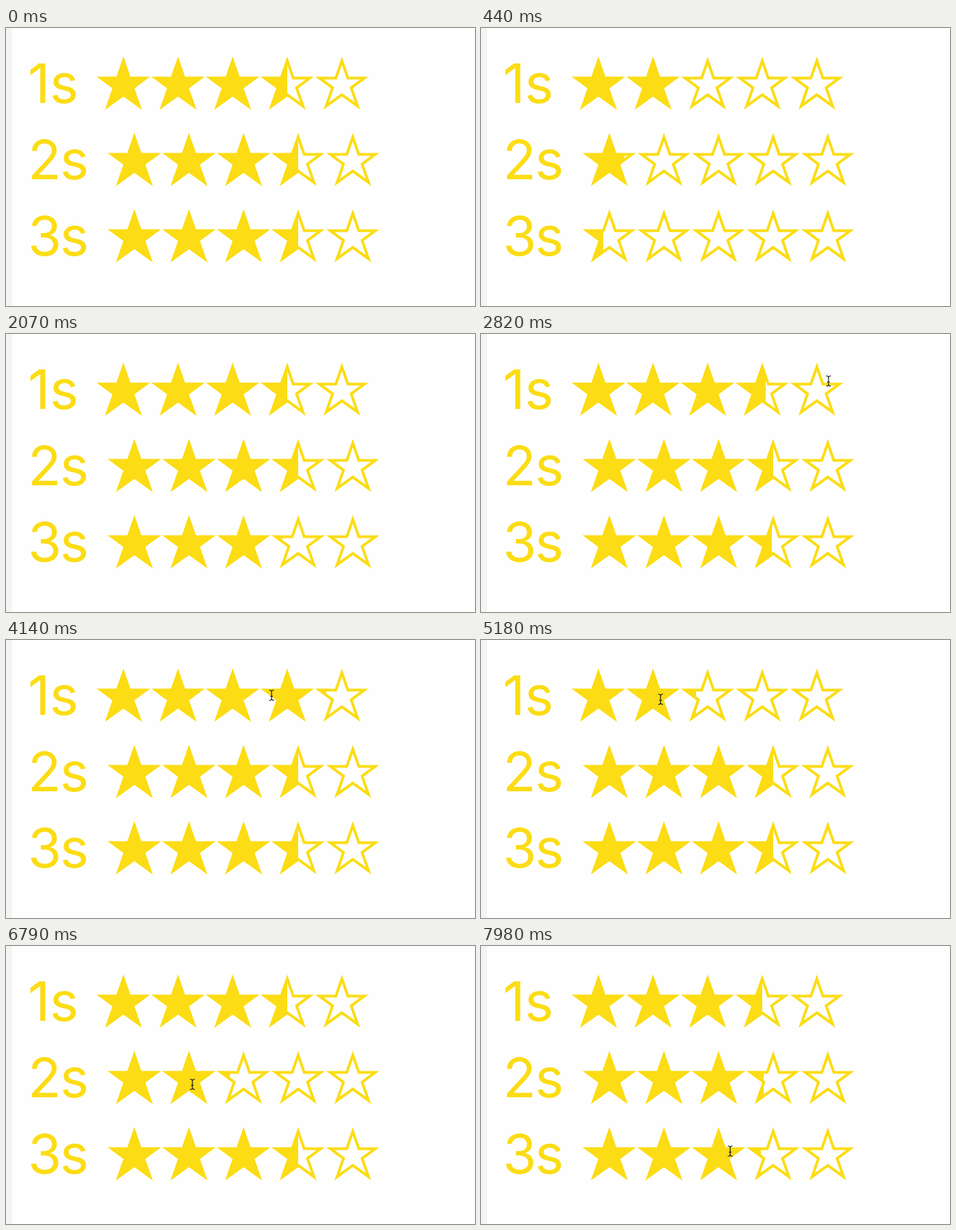
An HTML page without scripts that plays this animation: 687x408 px, repeating every 8 s.

```html
<!DOCTYPE html>
<html lang="en">
<head>
<meta charset="utf-8">
<title>Star rating transitions</title>
<style>
@property --t { syntax: "<number>"; inherits: true; initial-value: 0; }
@property --a { syntax: "<number>"; inherits: true; initial-value: 280; }
@property --b { syntax: "<number>"; inherits: true; initial-value: 280; }
@property --s { syntax: "<number>"; inherits: true; initial-value: 0; }

html, body { margin: 0; width: 100%; height: 100%; overflow: hidden; background: #fefefe; }
body { position: relative; animation: clock 8s infinite; }
svg { position: absolute; left: 0; top: 0; display: block; }
text { font: 400 80px Inter, "Liberation Sans", sans-serif; fill: #fcdc14; }
.full { fill: #fcdc14; }
.hollow { fill: none; stroke: #fcdc14; stroke-width: 8; }

@keyframes clock {
  0% { --t: 0; animation-timing-function: step-end; }
  1.6625% { --t: 140; animation-timing-function: steps(53, end); }
  99.56%, 100% { --t: 7980; }
}

/* Each row eases from width a to width b, starting at s */
.row { animation: 8s step-end infinite; }
.r1 { --d: 1000; --left: 132px; --top: 42px; animation-name: r1; }
.r2 { --d: 2000; --left: 148px; --top: 154px; animation-name: r2; }
.r3 { --d: 3000; --left: 148px; --top: 266px; animation-name: r3; }
@keyframes r1 {
  0% { --a: 280; --b: 280; --s: 0; }
  1.6625% { --a: 0; --b: 280; --s: 103; }
  34.91% { --a: 280; --b: 400; --s: 2740; }
  45.99% { --a: 400; --b: 320; --s: 3650; }
  58.92% { --a: 320; --b: 160; --s: 4605; }
  71.85%, 100% { --a: 160; --b: 280; --s: 5640; }
}
@keyframes r2 {
  0% { --a: 280; --b: 280; --s: 0; }
  1.6625% { --a: 0; --b: 280; --s: 103; }
  71.85% { --a: 280; --b: 160; --s: 5735; }
  86.63%, 100% { --a: 178; --b: 280; --s: 6840; }
}
@keyframes r3 {
  0% { --a: 280; --b: 280; --s: 0; }
  1.6625% { --a: 0; --b: 280; --s: 103; }
  90.33%, 100% { --a: 280; --b: 240; --s: 7170; }
}

/* The standard ease curve: solve its x cubic for u, then evaluate y */
.fill {
  --x: clamp(0, (var(--t) - var(--s)) / var(--d), 1);
  --q: calc((var(--x) - 0.15625) / 2);
  --r: sqrt(var(--q) * var(--q) + 0.0065918);
  --u: calc(0.25 + pow(var(--r) + var(--q), 1 / 3) - pow(var(--r) - var(--q), 1 / 3));
  --v: calc(1 - var(--u));
  --e: calc(var(--u) * (0.3 * var(--v) * var(--v) + 3 * var(--v) * var(--u) + var(--u) * var(--u)));
  position: absolute;
  left: var(--left);
  top: var(--top);
  height: 80px;
  width: calc((var(--a) + (var(--b) - var(--a)) * var(--e)) * 1px);
  overflow: hidden;
}

.cursor { animation: move 8s step-end infinite; }
.arrow { animation: arrow 8s step-end infinite; }
.beam { animation: beam 8s step-end infinite; }
@keyframes move {
  0% { transform: translate(-60px, -60px); }
  29.37% { transform: translate(514px, 394px); }
  31.22% { transform: translate(617px, 240px); }
  33.06% { transform: translate(575px, 120px); }
  34.91% { transform: translate(509px, 69px); }
  36.76% { transform: translate(496px, 50px); animation-timing-function: steps(4, end); }
  44.15% { transform: translate(470px, 74px); }
  45.99% { transform: translate(440px, 80px); }
  47.84% { transform: translate(415px, 82px); }
  49.69% { transform: translate(398px, 81px); }
  51.53% { transform: translate(389px, 81px); animation-timing-function: steps(3, end); }
  57.08% { transform: translate(384px, 82px); }
  58.92% { transform: translate(264px, 86px); }
  64.46% { transform: translate(263px, 87px); animation-timing-function: steps(3, end); }
  70.01% { transform: translate(262px, 92px); }
  71.85% { transform: translate(266px, 165px); }
  73.7% { transform: translate(272px, 208px); animation-timing-function: steps(6, end); }
  84.78% { transform: translate(273px, 203px); }
  86.63% { transform: translate(276px, 232px); }
  88.48% { transform: translate(300px, 249px); }
  90.33% { transform: translate(325px, 320px); animation-timing-function: steps(5, end); }
  99.56%, 100% { transform: translate(365px, 301px); }
}
@keyframes arrow {
  0%, 34.91%, 90.33%, 100% { opacity: 0; }
  29.37%, 88.48% { opacity: 1; }
}
@keyframes beam {
  0%, 34.91%, 90.33%, 100% { opacity: 1; }
  29.37%, 88.48% { opacity: 0; }
}
</style>
</head>
<body>
<svg width="687" height="408" viewBox="0 0 687 408">
  <defs>
    <path id="star" d="M40 0L50.2 29.5H79L56 46.5 67 78 40 58.5 13 78 24 46.5 1 29.5H29.8Z"/>
    <clipPath id="inside"><use href="#star"/></clipPath>
    <g id="one"><use href="#star" clip-path="url(#inside)"/></g>
    <g id="five">
      <use href="#one"/>
      <use href="#one" x="80"/>
      <use href="#one" x="160"/>
      <use href="#one" x="240"/>
      <use href="#one" x="320"/>
    </g>
  </defs>
  <rect width="9" height="408" fill="#f4f4f4"/>
  <text y="110"><tspan x="32">1</tspan><tspan x="64">s</tspan></text>
  <text y="222"><tspan x="32">2</tspan><tspan x="79">s</tspan></text>
  <text y="334"><tspan x="32">3</tspan><tspan x="79">s</tspan></text>
  <g class="hollow">
    <use href="#five" x="132" y="42"/>
    <use href="#five" x="148" y="154"/>
    <use href="#five" x="148" y="266"/>
  </g>
</svg>

<div class="row r1"><div class="fill"><svg class="full" width="400" height="80"><use href="#five"/></svg></div></div>
<div class="row r2"><div class="fill"><svg class="full" width="400" height="80"><use href="#five"/></svg></div></div>
<div class="row r3"><div class="fill"><svg class="full" width="400" height="80"><use href="#five"/></svg></div></div>

<svg width="687" height="408" viewBox="0 0 687 408">
  <g class="cursor">
    <path class="beam" d="M-3.5 -7.5Q0 -7.5 0 -5Q0 -7.5 3.5 -7.5M0 -5V5M-3.5 7.5Q0 7.5 0 5Q0 7.5 3.5 7.5M-2 1.5H2" fill="none" stroke="#111" stroke-width="1.2"/>
    <path class="arrow" d="M0 0V15.5L3.6 12.2 6.2 18 8.6 17 6.1 11.3H11.2Z" fill="#000" stroke="#fff"/>
  </g>
</svg>
</body>
</html>
```
